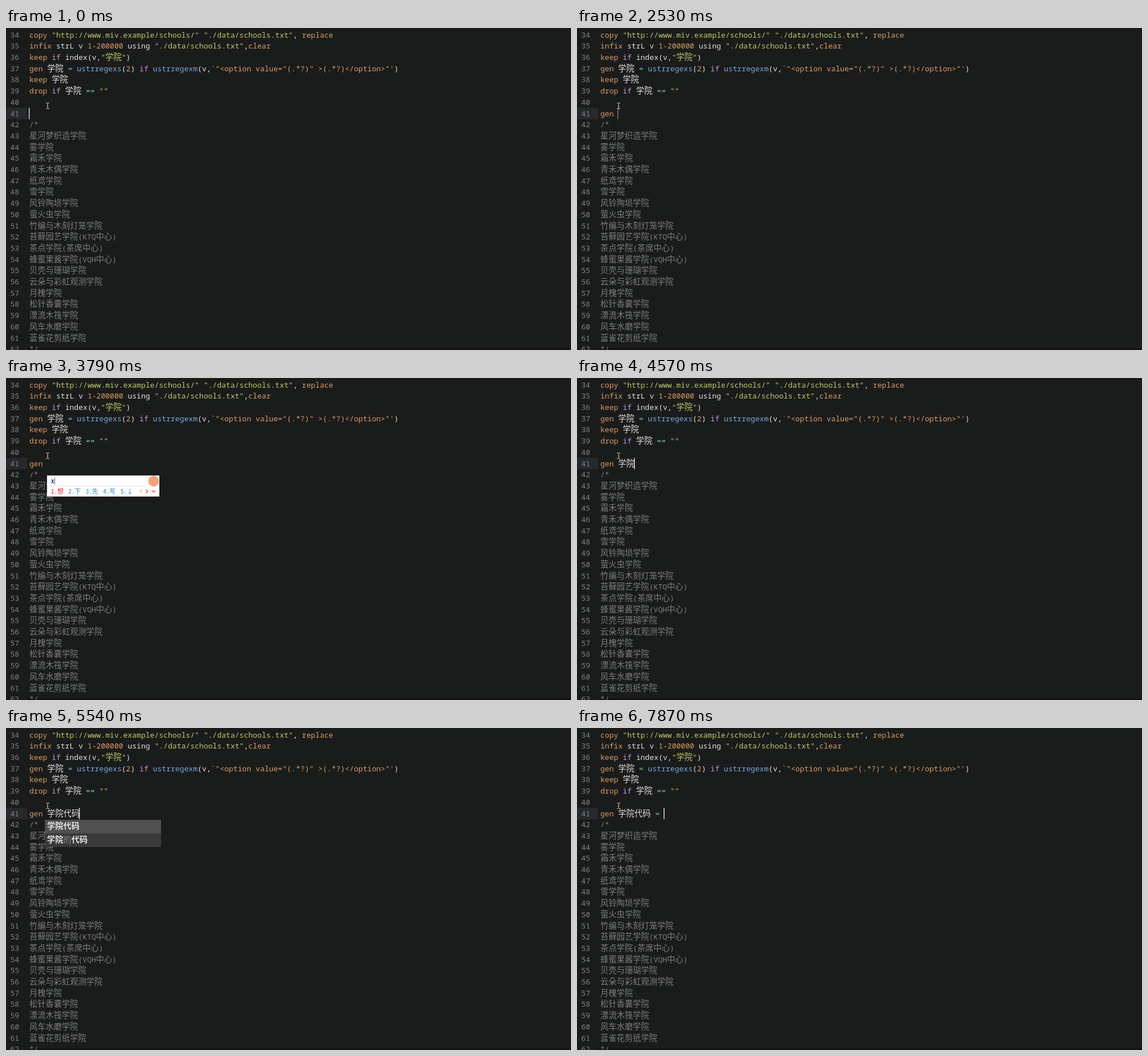
Write an HTML page with a canvas that moves like this. It is 991 by 565 pixels and loops after 8 s.

```html
<!DOCTYPE html>
<html lang="zh-CN">
<head>
<meta charset="utf-8">
<style>
html, body { margin: 0; width: 991px; height: 565px; overflow: hidden; background: #1a1c1b; }
canvas { display: block; }
</style>
</head>
<body>
<canvas id="stage" width="991" height="565"></canvas>
<script>
const ctx = document.getElementById('stage').getContext('2d');
const LOOP = 8000, FIRST = 34, PITCH = 19.7, LEFT = 41;
const LATIN_FONT = '500 13.07px "Noto Sans Mono", "DejaVu Sans Mono", monospace';
const CJK = '"Noto Sans CJK SC", "Noto Sans CJK", sans-serif';
const THIN_FONT = `300 14.25px "Noto Sans CJK SC Light", "Noto Sans CJK SC DemiLight", ${CJK}`;
const BOLD_FONT = `700 14.25px ${CJK}`;
const IME_FONT = '10.9px "Noto Sans Mono CJK SC", "Noto Sans CJK SC", monospace';

const BG = '#1a1c1b', WHITE = '#e2e2e0', ORANGE = '#d99b66', GREEN = '#c1c966',
      PURPLE = '#c397d8', BLUE = '#78a8dc', CYAN = '#70c0b1', GREY = '#7c7e7c';

const code = [
  [['copy ', ORANGE], ['"http:', GREEN], ['//www.miv.example/schools/" "./data/schools.txt"', GREEN], [', ', WHITE], ['replace', ORANGE]],
  [['infix ', ORANGE], ['strL v ', WHITE], ['1-200000', ORANGE], [' using ', WHITE], ['"./data/schools.txt"', GREEN], [',', WHITE], ['clear', ORANGE]],
  [['keep ', ORANGE], ['if ', PURPLE], ['index(v,', WHITE], ['"学院"', GREEN], [')', WHITE]],
  [['gen ', ORANGE], ['学院 ', WHITE], ['= ', CYAN], ['ustrregexs', BLUE], ['(', WHITE], ['2', ORANGE], [') ', WHITE], ['if ', PURPLE],
   ['ustrregexm', BLUE], ['(v,', WHITE], ['`"<option value="(.*?)" >(.*?)</option>"\'', ORANGE], [')', WHITE]],
  [['keep ', ORANGE], ['学院', WHITE]],
  [['drop ', ORANGE], ['if ', PURPLE], ['学院 ', WHITE], ['== ', CYAN], ['""', GREEN]],
  [], [],
  ...['/*', '星河梦织造学院', '雾学院', '霜禾学院', '青禾木偶学院', '纸鸢学院', '雪学院',
    '风铃陶埙学院', '萤火虫学院', '竹编与木刻灯笼学院', '苔藓园艺学院(KTQ中心)',
    '茶点学院(茶席中心)', '蜂蜜果酱学院(VQH中心)', '贝壳与珊瑚学院', '云朵与彩虹观测学院',
    '月槐学院', '松针香囊学院', '漂流木筏学院', '风车水磨学院', '蓝雀花剪纸学院', '*/'].map(s => [[s, GREY]])
];

// An input popup: typed letters, left edge and numbered candidates.
const popup = (x, pinyin, words) =>
  ({ x, pinyin, words: words.split(' ').map((word, i) => `${i + 1}.${word}`) });
const first = (pinyin, words) => popup(72, pinyin, words);
const second = (pinyin, words) => popup(100, pinyin, words);
const schoolWords = '学院 学员 雪原 学园 血缘';

// Menu rows alternate matched and unmatched parts.
const menuAll = [['学院'], ['学院', '代码'], ['学院', '的代码']];
const menuCode = [['学院代码'], ['学院', '的', '代码']];

// Each step changes only the fields it names.
const steps = [
  [0, { typed: '', caret: 1, ime: null, hint: false, menu: null }],
  [310, { caret: .5 }], [430, { caret: 0 }],
  [830, { caret: .35 }], [950, { caret: .75 }], [1070, { caret: 1 }],
  [1340, { caret: .05 }], [1580, { typed: 'ge', caret: 1 }], [1730, { typed: 'gen' }],
  [2160, { typed: 'gen ' }],
  [2530, { caret: .5 }], [2660, { ime: first('x', '想 下 先 写 ↓'), hint: true, caret: .2 }], [2800, { caret: 0 }],
  [3190, { caret: .8 }], [3340, { caret: 1 }], [3640, { hint: false, caret: .5 }], [3790, { caret: 0 }],
  [3910, { ime: first('xu', '需 许 续 徐 虚') }], [4040, { ime: first('xue', '学 雪 血 靴 削') }],
  [4180, { caret: .5 }],
  [4300, { ime: first('xuey', schoolWords), caret: .9 }], [4420, { ime: first('xueyuan', schoolWords), caret: 1 }],
  [4570, { typed: 'gen 学院', ime: null }], [4720, { menu: menuAll }],
  [4840, { ime: second('d', '的 对 等 _(:з」∠)_ の') }],
  [4970, { ime: second('da', '大 打 达 答 搭'), caret: .5 }],
  [5120, { ime: second('dai', '带 代 待 戴 呆'), caret: 0 }],
  [5270, { ime: second('daima', '代码 大妈 带 代 呆') }],
  [5390, { typed: 'gen 学院代码', ime: null, caret: 1 }], [5540, { menu: menuCode }],
  [5810, { typed: 'gen 学院代码 ', menu: null }],
  [6210, { typed: 'gen 学院代码 =' }], [6640, { typed: 'gen 学院代码 = ' }],
  [6950, { caret: .5 }], [7070, { typed: 'gen 学院代码 = “', caret: 1 }],
  [7440, { caret: .5 }], [7590, { caret: 0 }],
  [7870, { typed: 'gen 学院代码 = ', caret: 1 }]
];

function rect(x, y, w, h, color) {
  ctx.fillStyle = color;
  ctx.fillRect(x, y, w, h);
}

// Draws mixed Latin and Chinese text, returns the end position.
function write(text, x, y, color, wideFont = THIN_FONT) {
  ctx.fillStyle = color;
  for (const run of text.match(/[\u2e80-\uffef]+|[^\u2e80-\uffef]+/g) || []) {
    ctx.font = run.charCodeAt(0) >= 0x2e80 ? wideFont : LATIN_FONT;
    ctx.fillText(run, x, y);
    x += ctx.measureText(run).width;
  }
  return x;
}

const baseline = (line) => Math.round(16.6 + (line - FIRST) * PITCH);

function drawPage() {
  rect(0, 0, 991, 565, BG);
  rect(37, 562, 954, 3, '#17100f');
  rect(0, 140, 37, 20, '#28292d');
  code.forEach((parts, i) => {
    const line = FIRST + i, y = baseline(line);
    write(String(line), 7.5, y, '#808280');
    parts.reduce((x, [text, color]) => write(text, x, y, color), LEFT);
  });
}

function drawTyped({ typed, caret }) {
  const y = baseline(41);
  let x = write(typed.slice(0, 4), LEFT, y, ORANGE);
  const [name, rest] = typed.slice(4).split('=');
  x = write(name, x, y, WHITE);
  if (rest !== undefined) {
    x = write('=', x, y, CYAN);
    x = write(rest, x, y, WHITE);
  }
  ctx.globalAlpha = caret;
  rect(Math.floor(x - .6), 140, 1.3, 20, '#f0f0ee');
  ctx.globalAlpha = 1;
}

function drawMenu(rows) {
  rows.forEach((parts, i) => {
    const top = 161 + i * 23.8;
    rect(68, top, 204, 24, i ? '#3a3a3a' : '#505050');
    parts.reduce((x, part, k) => {
      const [color, font] = k % 2 ? ['#888886', THIN_FONT] : ['#e4e4e2', BOLD_FONT];
      return write(part, x, Math.round(top + 16), color, font);
    }, 72);
  });
  if (rows === menuAll) {
    ctx.font = `italic ${LATIN_FONT}`;
    ctx.fillStyle = '#747474';
    ctx.fillText('Variable', 205, 177);
  }
}

// A small arrow head pointing along (dx, dy).
function chevron(x, y, dx, dy, color) {
  ctx.strokeStyle = color;
  ctx.lineWidth = 1.4;
  ctx.beginPath();
  ctx.moveTo(x - dx * 1.6 - dy * 3, y - dy * 1.6 - dx * 3);
  ctx.lineTo(x + dx * 1.6, y + dy * 1.6);
  ctx.lineTo(x - dx * 1.6 + dy * 3, y - dy * 1.6 + dx * 3);
  ctx.stroke();
}

function drawIme({ pinyin, x, words }, hint) {
  ctx.font = IME_FONT;
  const advance = (word) => ctx.measureText(word).width + 8.7;
  const right = Math.round(x + 44.5 + words.reduce((sum, word) => sum + advance(word), 0));
  rect(x, 171, right - x, 37, '#ffffff');
  rect(x + 4, 189, right - x - 26, 1, '#dcdfe4');

  let wordX = x + 7;
  words.forEach((word, i) => {
    ctx.fillStyle = i ? '#1687d9' : '#e8202a';
    ctx.fillText(word, wordX, 203);
    wordX += advance(word);
  });
  chevron(right - 32, 199, -1, 0, '#c4c4c4');
  chevron(right - 22, 199, 1, 0, '#f0552e');
  chevron(right - 10, 199, 0, 1, '#f0552e');

  ctx.font = `bold ${IME_FONT}`;
  ctx.fillStyle = '#1450b8';
  ctx.fillText(pinyin, x + 7, 185);
  rect(Math.round(x + 7.5 + ctx.measureText(pinyin).width), 175, 1, 12, '#b04058');

  if (hint) {
    ctx.font = `8.3px ${CJK}`;
    ctx.fillStyle = '#1a62c4';
    ctx.fillText('6.更多特殊符号', 141, 184);
  }
  ctx.fillStyle = '#f9a27f';
  ctx.beginPath();
  ctx.arc(right - 10, 181, 9.5, 0, Math.PI * 2);
  ctx.fill();
}

function drawPointer() {
  rect(72.4, 132, 1.2, 9, '#c8c8c6');
  for (const y of [131, 141]) {
    rect(70, y, 2.4, 1, '#c8c8c6');
    rect(73.6, y, 2.4, 1, '#c8c8c6');
  }
}

function draw(now) {
  const time = now % LOOP;
  const state = Object.assign({}, ...steps.filter(([start]) => start <= time).map(([, change]) => change));
  drawPage();
  drawTyped(state);
  if (state.menu) drawMenu(state.menu);
  if (state.ime) drawIme(state.ime, state.hint);
  drawPointer();
  requestAnimationFrame(draw);
}
draw(0);
</script>
</body>
</html>
```
